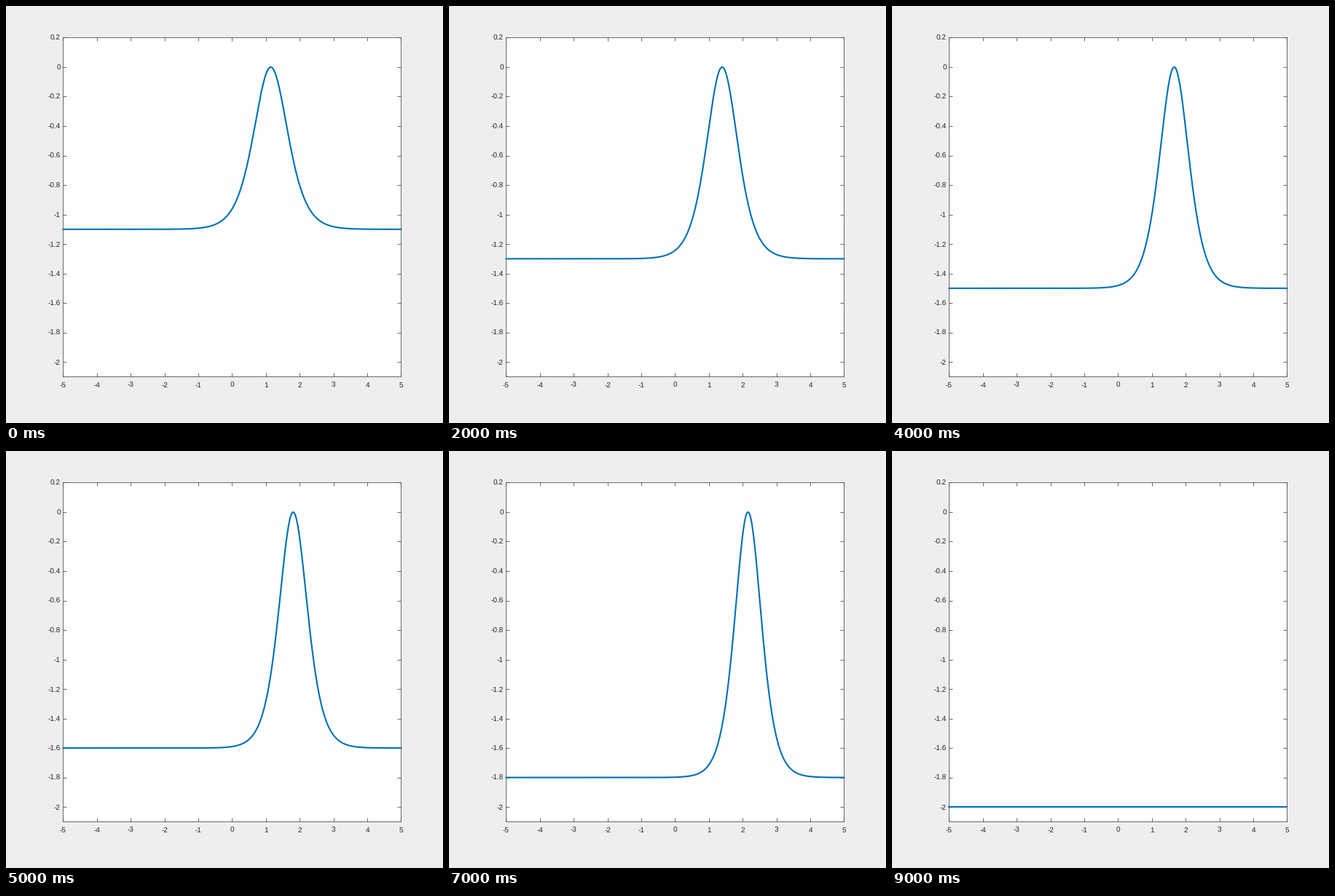
A matplotlib script that plays this animation: 600x573 px, repeating every 10000 ms.

```python
import numpy as np
import matplotlib.pyplot as plt
from matplotlib.animation import FuncAnimation

W, H, DPI = 600, 573, 100
PX = 72 / DPI  # points per pixel
LEFT, RIGHT, TOP, BOTTOM = 78.45, 542.45, 43.45, 509.45
FRAMES = 10
INK, RULE = "#262626", "#484848"

plt.rcParams["font.family"] = "Liberation Sans"
plt.rcParams["axes.unicode_minus"] = False
plt.rcParams["text.hinting"] = "none"


def wave(x, speed):
    """Dark sech-squared pulse whose centre runs off to infinity at speed 2."""
    k = np.sqrt(2 * speed)
    with np.errstate(divide="ignore"):
        phase = np.arctanh(np.sqrt(speed / 2))
    return -speed * np.tanh(k * (x - (speed - 0.6)) - phase) ** 2


fig = plt.figure(figsize=(W / DPI, H / DPI), dpi=DPI, facecolor="#efedef")
ax = fig.add_axes(
    [LEFT / W, 1 - BOTTOM / H, (RIGHT - LEFT) / W, (BOTTOM - TOP) / H],
    facecolor="#fefeff",
)
ax.set_xlim(-5, 5)
ax.set_ylim(-2.1, 0.2)

xticks = range(-5, 6)
yticks = [n / 5 for n in range(-10, 2)]
ax.set_xticks(xticks, [f"{t:g}" for t in xticks])
ax.set_yticks(yticks, [f"{t:g}" for t in yticks])
ax.tick_params(
    direction="in", top=True, right=True, length=5 * PX, width=0.8 * PX,
    color=RULE, labelcolor=INK, labelsize=10 * PX,
)
ax.tick_params(axis="x", pad=7 * PX)
ax.tick_params(axis="y", pad=3.6 * PX)
for spine in ax.spines.values():
    spine.set(linewidth=0.8 * PX, color=RULE)

x = np.linspace(-5, 5, 1001)
line, = ax.plot(x, wave(x, 1.1), color="#0070b8", lw=2.1 * PX,
                zorder=3, clip_on=False)


def update(i):
    line.set_ydata(wave(x, (11 + i) / 10))
    return (line,)


anim = FuncAnimation(fig, update, frames=FRAMES, interval=1000,
                     repeat=True, repeat_delay=0)
plt.show()
```
